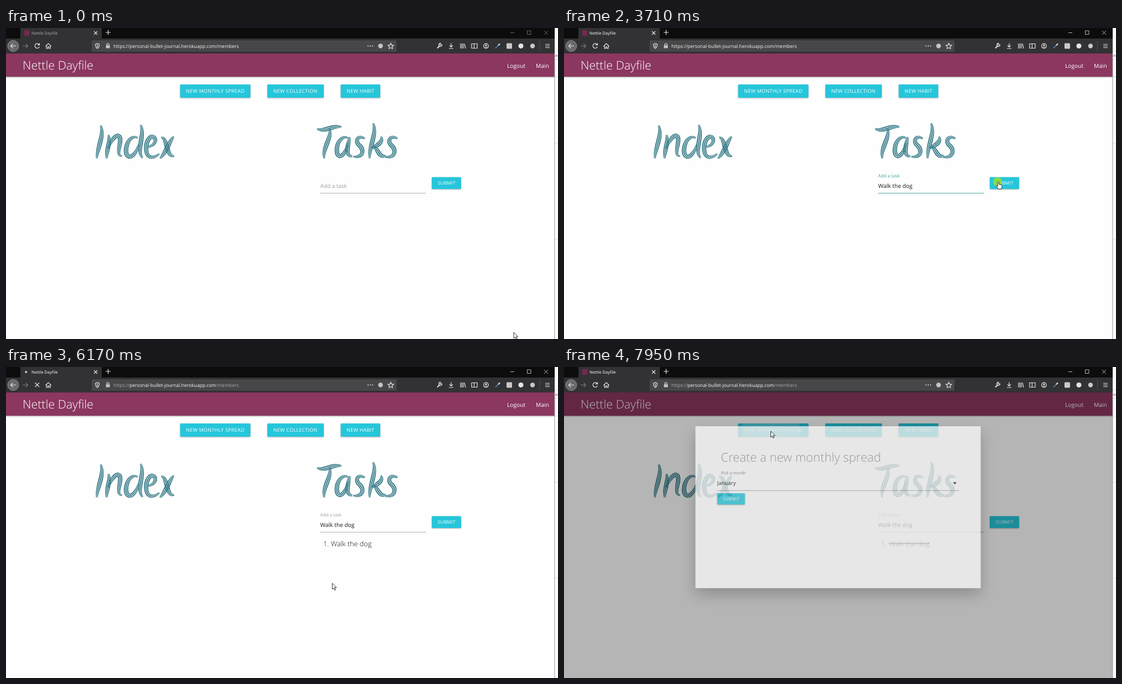
An HTML page that plays this animation: 997x562 px, repeating every 8 s.

```html
<!DOCTYPE html>
<html lang="en">
<head>
<meta charset="utf-8">
<title>Nettle Dayfile</title>
<style>
  html, body { margin: 0; width: 100%; height: 100%; overflow: hidden; background: #fefefe; }
  svg { display: block; width: 997px; height: 562px; }
  text { font-family: "Open Sans", "Noto Sans", sans-serif; white-space: pre; text-rendering: geometricPrecision; }
  .light { font-weight: 300; }
  .btn rect { fill: #26c6da; filter: drop-shadow(0 1.3px 1px rgba(0,0,0,.3)); }
  .btn text { fill: #fff; letter-spacing: .33px; }
  .icon { fill: none; stroke: #e4e4e6; stroke-width: 1.2; }
  .white { fill: #fff; }
  .pointer { fill: #fff; stroke: #000; stroke-width: .8; stroke-linejoin: round; }
  #sheet { filter: drop-shadow(0 12px 14px rgba(0,0,0,.3)); }
</style>
</head>
<body>
<svg id="stage" viewBox="0 0 997 562"></svg>
<script>
const TEAL = [38, 166, 154], GREY = [158, 158, 158];
const stage = document.getElementById('stage');

const rect = (x, y, w, h, fill, more = '') =>
  `<rect x="${x}" y="${y}" width="${w}" height="${h}" fill="${fill}" ${more}/>`;
const text = (x, y, size, fill, words, more = '') =>
  `<text x="${x}" y="${y}" font-size="${size}" fill="${fill}" ${more}>${words}</text>`;
const icon = (d, more = '') => `<path class="icon" d="${d}" ${more}/>`;
const dot = (x, y, r, fill, more = '') => `<circle cx="${x}" cy="${y}" r="${r}" fill="${fill}" ${more}/>`;
const button = (x, y, w, h, size, label) =>
  `<g class="btn">${rect(x, y, w, h, '', 'rx="1.4"')}${text(x + 10.7, y + h / 2 + 3.2, size, '#fff', label)}</g>`;

// A brush stroke made of three stripes that narrow at both ends
function brush(d) {
  const path = document.createElementNS('http://www.w3.org/2000/svg', 'path');
  path.setAttribute('d', d);
  const length = path.getTotalLength(), steps = 24;
  const edge = offset => Array.from({ length: steps + 1 }, (_, i) => {
    const u = i / steps;
    const a = path.getPointAtLength(u * length - .2), b = path.getPointAtLength(u * length + .2);
    const dx = b.x - a.x, dy = b.y - a.y, n = Math.hypot(dx, dy) || 1;
    const w = offset * Math.sin(Math.PI * (.07 + .86 * u)) ** .7;
    return `${(a.x - dy / n * w).toFixed(2)},${(a.y + dx / n * w).toFixed(2)}`;
  });
  return [-3, 0, 3].map(k =>
    `<polygon fill="#3a7d8a" points="${[...edge(k - 1.05), ...edge(k + 1.05).reverse()].join(' ')}"/>`).join('');
}

const headings = [
  // Index
  'M171 176C178 194 165 215 164 236', 'M185 193C189 208 181 220 182 236',
  'M184 218C190 201 203 187 206 199C208 211 197 231 210 232',
  'M238 199C226 191 215 210 217 225C219 238 233 235 240 210',
  'M243 175C252 192 234 222 247 235',
  'M255 215C268 214 274 202 267 197C259 192 250 210 254 225C257 237 269 235 277 227',
  'M280 198C292 196 289 236 304 231', 'M303 196C295 205 289 225 278 236',
  // Tasks
  'M562 182C575 189 590 175 606 179', 'M585 182C588 200 571 218 575 236',
  'M618 199C606 192 595 210 598 226C601 237 612 232 618 208', 'M621 197C617 214 612 232 626 232',
  'M648 200C636 192 629 204 638 212C648 220 645 236 627 232',
  'M663 172C671 190 655 215 657 236', 'M660 217C673 212 682 204 677 196', 'M664 214C673 220 673 235 687 231',
  'M707 200C695 192 687 204 696 212C706 220 703 236 685 233'
].map(brush).join('');

const chrome = `
  ${rect(0, 0, 991, 19, '#0c0c0d')}${rect(26, 0, 147, 20, '#323234')}${rect(0, 19, 991, 27, '#323234')}
  ${rect(33, 4, 9, 10, '#74294f', 'id="favicon"')}${dot(37.5, 9, 2, '#c8c8cc', 'id="spinner"')}
  ${text(46, 11.8, 7.55, '#fff', 'Nettle Dayfile', 'id="tab"')}
  ${icon('M159 6l6 6m0-6l-6 6', 'stroke-width="1.4"')}${icon('M180 8h9m-4.5-4.5v9')}
  <g id="controls">${icon('M911 8.5h7M941.500 5h6.500v6.500h-6.500zM972 5l7 7m0-7l-7 7', 'style="stroke-width:.8"')}</g>
  ${dot(13, 32.5, 10, '#69696b', 'stroke="#98989a" stroke-width=".8"')}
  ${icon('M18 32.500H8.500m4-4l-4 4 4 4')}
  ${icon('M30 32.500h9.500m-4-4l4 4-4 4', 'opacity=".4"')}
  <g id="reload">${icon('M60 30a4.200 4.200 0 1 0 .3 4M60.500 27.500v3.200h-3.500')}</g>
  <g id="stop">${icon('M52.500 28.500l7.500 7.500m0-7.500l-7.500 7.500')}</g>
  ${icon('M71.500 33l5-5 5 5M73 32v5h2.500v-3h2v3h2.500v-5')}
  ${rect(155.5, 23, 549, 19, '#474749', 'stroke="#5a5a5c" stroke-width=".6"')}
  ${icon('M161.500 29.500l3.500-1.500 3.500 1.500c0 4-1 6-3.500 7.500-2.500-1.500-3.500-3.500-3.500-7.500zM165 30v5')}
  ${rect(180.5, 31.5, 7, 5, '#c4c4c6')}${icon('M182 32v-2a2 2 0 0 1 4 0v2')}
  <text x="194" y="36" font-size="8.54" fill="#f9f9fa"><tspan class="faint">https://</tspan>personal-bullet-journal.herokuapp.com<tspan class="faint">/members</tspan></text>
  ${[654, 658, 662].map(x => dot(x, 32.5, 1.1, '#d6d6d8')).join('')}
  ${dot(676.5, 32.5, 4.2, '#c4c4c6')}
  ${icon('M695 27.500l1.500 3.400 3.600.4-2.700 2.500.7 3.600-3.100-1.800-3.100 1.800.7-3.600-2.700-2.500 3.600-.4z')}
  ${icon('M779 36.500l4.500-4.500', 'style="stroke-width:2"')}${icon('M787 29.500l-2 1.500-1.500-1.500 1.500-2a3 3 0 1 0 2.500 2.500')}
  ${icon('M804 27.500v7m-3-3l3 3 3-3M800 37h8')}
  ${icon('M821 28v9m2.500-9v9m2.500-9v9m2-8.500l2 8.500')}
  ${icon('M841 28.500h10v8h-10zM845.500 28.500v8')}
  ${dot(867, 32.5, 4.3, 'none', 'stroke="#e4e4e6" stroke-width="1.2"')}${dot(867, 31.3, 1.6, '#e4e4e6')}${icon('M864.500 35.500q2.500-2 5 0')}
  ${icon('M884 36.500l5-5', 'style="stroke:#5b8fc4;stroke-width:1.600"')}${icon('M889 31.500l3-3', 'style="stroke-width:2.200"')}
  ${rect(904, 27.5, 10, 10, '#c9c9cb', 'rx="1.5"')}${dot(930, 32.5, 4.5, '#e4e4e6')}${dot(951, 32.5, 4.2, '#c9c9cb')}
  ${rect(963.5, 23, .8, 19, '#59595b')}${icon('M974 29.500h8m-8 3h8m-8 3h8')}
  ${rect(991, 0, 6, 562, '#fbfbfb')}${rect(990.3, 46, 1, 516, '#9a9a9a')}
  ${[41, 56, 88, 208, 381].map(y => rect(991, y, 6, .7, '#d4d4d4')).join('')}
  ${text(991.5, 52, 7, '#777', 'w')}`;

const page = `
  ${rect(0, 46, 990.5, 42, '#8b375f', 'style="filter:drop-shadow(0 1.300px 1.300px rgba(0,0,0,.4))"')}
  ${text(30, 75, 21.4, '#fff', 'Nettle Dayfile', 'class="light"')}
  ${text(905, 71.7, 10.2, '#fff', 'Logout')}${text(957, 71.7, 10.2, '#fff', 'Main')}
  ${button(314.5, 102, 127, 24, 8.9, 'NEW MONTHLY SPREAD')}
  ${button(472, 102, 102, 24, 8.9, 'NEW COLLECTION')}
  ${button(604.5, 102, 71.5, 24, 8.9, 'NEW HABIT')}
  <clipPath id="face">${rect(314.5, 102, 127, 24, '')}</clipPath>
  <g clip-path="url(#face)">${dot(374, 114, 0, '#fff', 'id="ripple" opacity=".2"')}</g>
  ${headings}
  ${text(567.6, 289.3, 9.95, '#9e9e9e', 'Add a task', 'id="label"')}
  ${text(567.6, 288.7, 10.2, '#161616', '', 'id="value"')}
  ${rect(568, 277.5, .9, 13, '#111', 'id="caret"')}
  ${rect(567.5, 298, 191, .8, '#9e9e9e')}${rect(567.5, 298, 191, 1.4, '#26a69a', 'id="line"')}
  ${button(769, 269.5, 53, 21.5, 8.25, 'SUBMIT')}
  <g id="list">${text(573, 323.6, 12.6, '#111', '1.', 'class="light"')}${text(586.7, 323.6, 12.7, '#111', 'Walk the dog', 'class="light" id="item"')}</g>`;

const modal = `
  ${rect(0, 46, 990.5, 516, '#000', 'id="shade"')}
  <g id="modal">
    ${rect(-272.5, -154.8, 545, 309.6, '#fafafa', 'id="sheet"')}
    ${text(-224, -87, 23.3, '#8e8e8e', 'Create a new monthly spread', 'class="light"')}
    ${text(-224, -62.5, 7.9, '#7c7c7c', 'Pick a month')}
    ${text(-231, -42.3, 10.1, '#161616', 'January')}
    ${rect(-231, -32.2, 462, .8, '#8a8a8a')}<path d="M219.500 -47.500h7l-3.500 3.500z"/>
    ${button(-231, -26.5, 53, 21.5, 8.25, 'SUBMIT')}
  </g>`;

const pointer = `
  ${dot(0, 0, 8, '#8fdc3c', 'id="press" opacity=".92"')}
  <g id="mouse">
    <path id="arrow" class="pointer" d="M0 0V10.800L2.500 8.500 4.300 12.400 6 11.600 4.300 7.800H7.700Z"/>
    <path id="hand" class="pointer" d="M0 0c.9-.4 1.700 0 1.700 1v3.600l1.900.3 2.600.7c.9.3 1.200.9 1.100 1.800l-.5 3-.9 2.600H.4L-2.800 8.600c-.9-1.200.3-2 1.300-1.200l.8.8V1c0-.5.2-.9.7-1z"/>
    <path id="beam" d="M-2.200 -6H2.200M0 -6V6M-2.200 6H2.200" stroke="#222" fill="none"/>
  </g>`;

stage.innerHTML = chrome + page + modal + pointer;

const el = Object.fromEntries([...stage.querySelectorAll('[id]')].map(e => [e.id, e]));
const set = (id, attrs) => { for (const k in attrs) el[id].setAttribute(k, attrs[k]); };
const show = (id, on) => { el[id].style.display = on ? '' : 'none'; };
const ramp = (t, from, span) => Math.max(0, Math.min(1, (t - from) / span));
const within = (t, spans) => spans.some(([a, b]) => t >= a && t < b);
const mix = (a, b, f) => `rgb(${a.map((v, i) => Math.round(v + (b[i] - v) * f))})`;

const TASK = 'Walk the dog';
const KEYS = [1380, 1530, 1680, 1760, 1910, 1990, 2070, 2140, 2220, 2390, 2460, 2630];
const FOCUS = 650, BLUR = 3650, OPEN = 7851;
const LOADS = [[3860, 4600], [5860, 6300]];
const PRESSES = [[640, 760], [3640, 3820], [5710, 5860], [7260, 7410], [7750, 7845]];
const TRACK = [
  [70, 917, 550], [540, 602, 290], [740, 600, 290], [840, 600, 301], [3000, 600, 301], [3260, 665, 349],
  [3560, 784, 278], [4000, 784, 278], [4330, 690, 345], [4630, 605, 357], [4710, 605, 344], [4930, 606, 342],
  [5250, 606, 325], [5880, 606, 325], [6110, 598, 402], [6630, 369, 107], [6710, 374, 102],
  [7550, 374, 102], [7710, 374, 113], [7870, 374, 114], [7950, 373.5, 116]
];

function mouseAt(t) {
  const next = TRACK.findIndex(k => k[0] > t);
  if (next < 1) return TRACK.at(next).slice(1);
  const [t0, x0, y0] = TRACK[next - 1], [t1, x1, y1] = TRACK[next];
  const u = (t - t0) / (t1 - t0), e = u * u * (3 - 2 * u);
  return [x0 + (x1 - x0) * e, y0 + (y1 - y0) * e];
}

function render(t) {
  // Browser frame
  const active = t >= FOCUS, loading = within(t, LOADS);
  set('tab', { fill: active ? '#fff' : '#a9a9ab' });
  set('controls', { opacity: active ? 1 : .55 });
  show('favicon', !loading);
  show('spinner', loading);
  set('spinner', { cx: 37.5 + 3 * Math.sin(t / 110) });
  show('stop', loading);
  show('reload', !loading);
  set('reload', { opacity: within(t, [[4600, 5200], [6300, 6940]]) ? .4 : 1 });
  stage.querySelectorAll('.faint').forEach(e => e.setAttribute('fill', t >= 4350 ? '#a9a9ab' : '#f9f9fa'));

  // Task form
  const lift = ramp(t, FOCUS, 200);
  const focus = ramp(t, FOCUS, 250) * (1 - ramp(t, BLUR, 300));
  set('label', { y: 289.3 - 19.2 * lift, 'font-size': 9.95 - 2 * lift, fill: mix(GREY, TEAL, focus) });
  set('line', { height: t < BLUR ? 1.4 : .9, opacity: focus });
  const typed = KEYS.filter(k => k <= t);
  el.value.textContent = TASK.slice(0, typed.length);
  set('caret', { x: 567.6 + (typed.length ? el.value.getComputedTextLength() : 0) });
  const since = t - (typed.at(-1) ?? FOCUS);
  show('caret', t >= FOCUS && t < BLUR && since % 1000 < 500);
  show('list', t >= 4350);
  el.item.style.textDecoration = t >= 6250 ? 'line-through' : 'none';

  // Dialog
  set('ripple', { r: Math.max(0, .2625 * (t - 7752)) });
  const u = ramp(t, OPEN, 285), p = 1 - (1 - u) ** 3;
  set('shade', { opacity: .5 * (1 - (1 - u) ** 2) });
  set('modal', { opacity: p, transform: `translate(495 ${224.7 + 39.4 * p}) scale(${.8 + .2 * p})` });
  show('modal', p > 0);

  // Mouse
  const [x, y] = mouseAt(t);
  const hand = within(t, [[3500, 4070], [5100, 5930], [7640, OPEN]]), beam = within(t, [[500, 790]]);
  show('hand', hand);
  show('beam', beam);
  show('arrow', !hand && !beam);
  set('mouse', { transform: `translate(${x} ${y})` });
  show('press', within(t, PRESSES));
  set('press', { cx: x - (hand ? 1 : 0), cy: y });
}

const start = performance.now();
(function tick() {
  render((performance.now() - start) % 8000);
  requestAnimationFrame(tick);
})();
</script>
</body>
</html>
```
